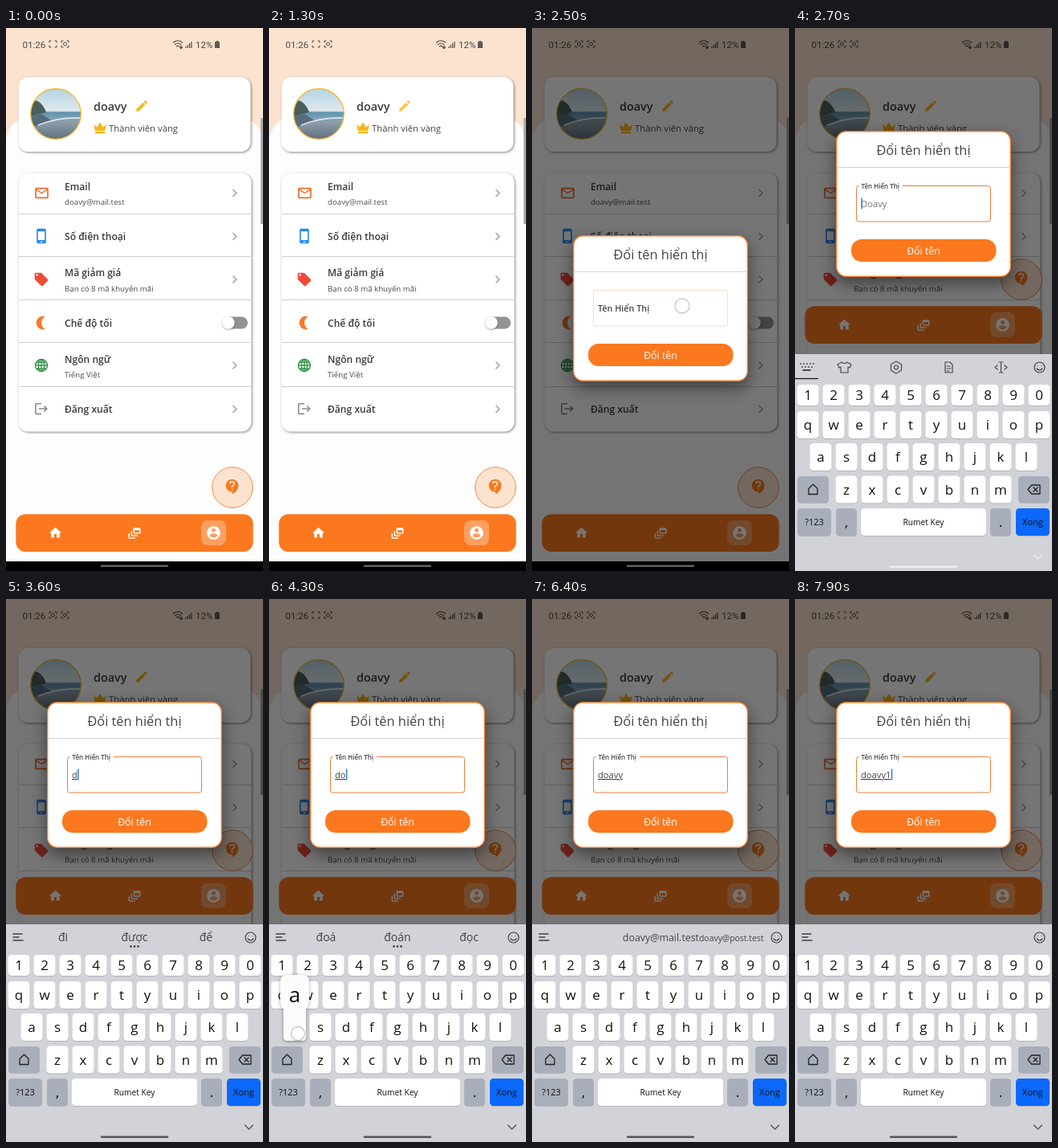
These frames come from a looping animation (320 px wide and 676 px high, 8 s). An HTML page:

```html
<!DOCTYPE html>
<html lang="vi">
<head>
<meta charset="utf-8">
<title>Đổi tên hiển thị</title>
<style>
html, body { margin: 0; width: 100%; height: 100%; overflow: hidden; background: #fff; }
svg.stage { display: block; width: 100%; height: 100%; }
text { font-family: 'Open Sans', 'Noto Sans', sans-serif; fill: #444; }
.head { font-size: 12.1px; font-weight: 600; fill: #3b3b3b; }
.sub { font-size: 9.7px; fill: #4c4c4c; }
.status text { font: 11.6px Roboto, 'Noto Sans', sans-serif; fill: #4d4946; }
.mid { text-anchor: middle; }
.line { fill: none; stroke-linecap: round; stroke-linejoin: round; }
.card { fill: #fff; filter: drop-shadow(1.5px 1.5px 1.6px #0007); }
.key { fill: #fff; }
.dark { fill: #a9aebb; }
.blue { fill: #0b68fb; }
.label { font-size: 17px; fill: #111; text-anchor: middle; }

.scrim, .dialog, .lift, .rise, .frame, .float, .rest, .tap, .tap2, .navline {
  animation: 8s linear infinite;
}
.rec { animation: rec 1s step-end infinite; }
.scrim { animation-name: scrim; }
.dialog { animation-name: dialog; }
.lift { animation-name: lift; }
.rise { animation-name: rise; }
.frame { animation-name: frame; }
.float { animation-name: float; }
.rest { animation-name: rest; }
.tap { animation-name: tap; }
.tap2 { animation-name: tap2; }
.navline { animation-name: navline; }

@keyframes rec { 0%, 85% { opacity: 0 } 35% { opacity: 1 } }
@keyframes scrim { 0%, 17.5% { opacity: 0 } 18.75% { opacity: .45 } 20.5%, 100% { opacity: .54 } }
@keyframes dialog {
  0%, 17.6% { opacity: 0; transform: none }
  18.75% { opacity: .77 }
  20.2% { opacity: 1 }
  31.8% { opacity: 1; transform: none }
  33.5%, 100% { opacity: 1; transform: translateY(-130px) }
}
@keyframes lift { 0%, 31.8% { transform: none } 33.5%, 100% { transform: translateY(-259px) } }
@keyframes rise { 0%, 31.6% { transform: translateY(272px) } 33.5%, 34.2% { transform: translateY(1px) } 35%, 100% { transform: none } }
@keyframes frame { 0%, 32% { stroke: #f9dcc6 } 33.5%, 100% { stroke: #e8803a } }
@keyframes float { 0%, 32.4% { opacity: 0 } 33.6%, 100% { opacity: 1 } }
@keyframes rest { 0%, 32.2% { opacity: 1 } 33%, 100% { opacity: 0 } }
@keyframes tap { 0%, 16% { opacity: 0 } 16.6%, 18.9% { opacity: .55 } 20%, 100% { opacity: 0 } }
@keyframes tap2 { 0%, 29.5% { opacity: 0 } 30%, 31.8% { opacity: 1 } 32.3%, 100% { opacity: 0 } }
@keyframes navline { 0%, 34.2% { stroke: #eceef2 } 36%, 100% { stroke: #55565c } }
</style>
</head>
<body>
<svg class="stage" viewBox="0 0 320 676" xmlns="http://www.w3.org/2000/svg">
<defs>
  <symbol id="pencil" viewBox="0 0 24 24"><path d="M3 17.25V21h3.75L17.81 9.94l-3.75-3.75zM20.71 7.04a1 1 0 0 0 0-1.41l-2.34-2.34a1 1 0 0 0-1.41 0l-1.83 1.83 3.75 3.75z"/></symbol>
  <symbol id="mail" viewBox="0 0 24 24"><path d="M22 6c0-1.1-.9-2-2-2H4c-1.1 0-2 .9-2 2v12c0 1.1.9 2 2 2h16c1.1 0 2-.9 2-2zm-2 0l-8 5-8-5zm0 12H4V8l8 5 8-5z"/></symbol>
  <symbol id="phone" viewBox="0 0 24 24"><path fill-rule="evenodd" d="M7 1h10a2 2 0 0 1 2 2v18a2 2 0 0 1-2 2H7a2 2 0 0 1-2-2V3a2 2 0 0 1 2-2zM7 5v13h10V5zM10 20v1.3h4V20z"/></symbol>
  <symbol id="tag" viewBox="0 0 24 24"><path d="M21.41 11.58l-9-9A2 2 0 0 0 11 2H4a2 2 0 0 0-2 2v7c0 .55.22 1.05.59 1.42l9 9a2 2 0 0 0 2.82 0l7-7a2 2 0 0 0 0-2.84zM5.5 7a1.5 1.5 0 1 1 0-3 1.5 1.5 0 0 1 0 3z"/></symbol>
  <symbol id="moon" viewBox="0 0 24 24"><path d="M17 2.5A10 10 0 1 0 17 21.5A11 11 0 0 1 17 2.5z"/></symbol>
  <symbol id="logout" viewBox="0 0 24 24"><path d="M17 7l-1.41 1.41L18.17 11H8v2h10.17l-2.58 2.58L17 17l5-5zM4 5h8V3H4a2 2 0 0 0-2 2v14a2 2 0 0 0 2 2h8v-2H4z"/></symbol>
  <symbol id="home" viewBox="0 0 24 24"><path d="M10 20v-6h4v6h5v-8h3L12 3 2 12h3v8z"/></symbol>
  <symbol id="feed" viewBox="0 0 24 24"><path d="M8 8H6v7a2 2 0 0 0 2 2h9v-2H8zM20 3h-8a2 2 0 0 0-2 2v6a2 2 0 0 0 2 2h8a2 2 0 0 0 2-2V5a2 2 0 0 0-2-2zm0 8h-8V7h8zM4 12H2v7a2 2 0 0 0 2 2h9v-2H4z"/></symbol>
  <symbol id="user" viewBox="0 0 24 24"><path d="M12 2a10 10 0 1 0 0 20 10 10 0 0 0 0-20zm0 3a3 3 0 1 1 0 6 3 3 0 0 1 0-6zm0 14.2a7.2 7.2 0 0 1-6-3.22c.03-1.99 4-3.08 6-3.08s5.97 1.09 6 3.08a7.2 7.2 0 0 1-6 3.22z"/></symbol>
  <symbol id="help" viewBox="0 0 24 24"><path d="M11.5 2a8.5 8.5 0 0 0 0 17h.5v3c4.86-2.34 8-7 8-11.5A8.5 8.5 0 0 0 11.5 2zm1 14.5h-2v-2h2zm0-3.5h-2c0-3.25 3-3 3-5a2 2 0 0 0-4 0h-2a4 4 0 0 1 8 0c0 2.5-3 2.75-3 5z"/></symbol>
  <path id="next" class="line" d="M-2.2-4L2-0L-2.2 4" stroke="#999" stroke-width="1.3"/>
  <path id="corners" class="line" d="M-4.5-2v-2h2M2.5-4h2v2M4.5 2v2h-2M-2.5 4h-2v-2" stroke="#4d4946"/>
  <linearGradient id="photo" x2="0" y2="1">
    <stop offset="0" stop-color="#b3d3e4"/><stop offset=".44" stop-color="#dfe9ec"/>
    <stop offset=".47" stop-color="#5f92ad"/><stop offset=".6" stop-color="#7fa5b6"/>
    <stop offset=".68" stop-color="#8d9ba6"/><stop offset="1" stop-color="#5d6e80"/>
  </linearGradient>
  <clipPath id="round"><circle cx="62" cy="107" r="31"/></clipPath>
</defs>

<rect width="320" height="676" fill="#fbe3d0"/>
<rect y="110" width="320" height="600" rx="32" fill="#fdfdfd"/>

<rect class="card" x="15.5" y="61" width="289" height="93" rx="12"/>
<g clip-path="url(#round)">
  <rect x="30" y="75" width="64" height="64" fill="url(#photo)"/>
  <path d="M30 93q6-5 11-1 6 4 9 13l-20 5z" fill="#4a5f5c"/>
  <path d="M30 110l14-3 14 9-28 8z" fill="#566b7c"/>
  <path d="M40 121q24-10 54-9" stroke="#dfe5e7" stroke-width="1.6" fill="none"/>
</g>
<circle cx="62" cy="107" r="31.300" fill="none" stroke="#f3b11d" stroke-width="1.200"/>
<text x="109" y="103" font-size="14.4" font-weight="600" style="fill:#3b3b3b">doavy</text>
<use href="#pencil" x="160" y="88" width="18" height="18" fill="#fbb41a"/>
<path d="M109 120l4 3.6 4-6 4 6 4-3.6-1.8 8h-12.4zM111 129h12v2.3h-12z" fill="#fdb515"/>
<text x="128" y="129" font-size="11.3">Thành viên vàng</text>

<rect class="card" x="15.5" y="180.5" width="290" height="322" rx="12"/>
<path d="M16 231.500h289M16 284.500h289M16 338.500h289M16 391.500h289M16 446.500h289" stroke="#cfcfcf"/>
<use href="#mail" x="34.500" y="195.500" width="20" height="20" fill="#f0682a"/>
<use href="#phone" x="34" y="249" width="20" height="20" fill="#2a8bee"/>
<use href="#tag" x="34" y="303" width="20" height="20" fill="#f04a38"/>
<use href="#moon" x="34.500" y="357" width="20" height="20" fill="#f8792a"/>
<g fill="none" stroke="#369447" stroke-width="1.4">
  <circle cx="44" cy="420" r="7.500"/><ellipse cx="44" cy="420" rx="3.600" ry="7.500"/>
  <path d="M44 412.500v15M36.500 420h15M38 416h12M38 424h12"/>
</g>
<use href="#logout" x="34.500" y="464.500" width="19" height="19" fill="#8c8c8c"/>
<text class="head" x="73" y="202">Email</text>
<text class="sub" x="73" y="220">doavy@mail.test</text>
<text class="head" x="73" y="264">Số điện thoại</text>
<text class="head" x="73" y="309">Mã giảm giá</text>
<text class="sub" x="73" y="327.500">Bạn có 8 mã khuyến mãi</text>
<text class="head" x="73" y="372">Chế độ tối</text>
<text class="head" x="73" y="416.500">Ngôn ngữ</text>
<text class="sub" x="73" y="435">Tiếng Việt</text>
<text class="head" x="73" y="479">Đăng xuất</text>
<use href="#next" x="285" y="205.500"/><use href="#next" x="285" y="259.500"/>
<use href="#next" x="285" y="313"/><use href="#next" x="285" y="420"/><use href="#next" x="285" y="474.500"/>
<rect x="271" y="359.500" width="30" height="15" rx="7.500" fill="#929292"/>
<circle cx="277" cy="367" r="7.700" fill="#fff" style="filter:drop-shadow(0 1px 1px #0005)"/>
<rect x="317" y="112" width="3" height="132" fill="#a9a9a9"/>

<g class="lift">
  <circle cx="282" cy="572" r="25.300" fill="#fbe3d0" stroke="#ef8a46"/>
  <use href="#help" x="271" y="560" width="22" height="22" fill="#f8781e"/>
  <rect x="12.300" y="605.300" width="295.400" height="46.700" rx="12" fill="#fb781e"/>
  <rect x="243" y="613" width="31" height="31" rx="8" fill="#fff" opacity=".3"/>
  <g fill="#fff">
    <use href="#home" x="52.500" y="619.500" width="18" height="18"/>
    <use href="#feed" x="151" y="620" width="18" height="18"/>
    <use href="#user" x="248.500" y="618.500" width="20" height="20"/>
  </g>
</g>

<g class="status">
  <text x="20.500" y="24.500">01:26</text>
  <use href="#corners" x="58.500" y="20"/>
  <circle class="rec" cx="58.500" cy="20" r="2" fill="none" stroke="#4d4946"/>
  <use href="#corners" x="73.500" y="20"/>
  <circle cx="73.500" cy="20" r="2" fill="none" stroke="#4d4946"/>
  <path class="line" d="M208.500 18q5.500-4.500 11 0M210.500 20.500q3.500-3 7 0M212.500 22.800q1.500-1.300 3 0M218 22v3M216.500 24l1.500 1.500 1.500-1.500" stroke="#4d4946" stroke-width="1.200"/>
  <path d="M224 25v-2M226.300 25v-4M228.600 25v-6M230.900 25v-8" stroke="#4d4946" stroke-width="1.200"/>
  <text x="236" y="24.500">12%</text>
  <path d="M261.500 16h3v1.300h1.500V25h-6v-7.700h1.500z" fill="#5d5854"/>
</g>

<rect class="scrim" width="320" height="676"/>

<rect y="664" width="320" height="12"/>
<path class="line" d="M119 669.700h82" stroke="#626262" stroke-width="2.400"/>

<circle class="tap" cx="169" cy="97" r="9" fill="#fff" style="filter:drop-shadow(0 0 1.5px #fff)"/>

<g class="dialog">
  <rect x="51.700" y="258.700" width="216.600" height="180.600" rx="12" fill="#fff" stroke="#f27f30" stroke-width="1.400" style="filter:drop-shadow(0 8px 10px #0007)"/>
  <text class="mid" x="160" y="287.500" font-size="16.400">Đổi tên hiển thị</text>
  <path d="M53 303.500h214" stroke="#d2d2d2"/>
  <rect class="frame" x="76.500" y="326.500" width="167" height="44.500" rx="3" fill="#fff"/>
  <text class="rest" x="82" y="353" font-size="10.800" font-weight="600">Tên Hiển Thị</text>
  <g class="float">
    <rect x="80" y="325" width="54" height="4" fill="#fff"/>
    <text x="82.500" y="330" font-size="8" font-weight="600">Tên Hiển Thị</text>
  </g>
  <text id="hint" x="82" y="353" font-size="11.200" style="fill:#777">Doavy</text>
  <text id="typed" x="82" y="353" font-size="11.200" text-decoration="underline"></text>
  <rect id="caret" y="341.500" width="1.500" height="14" fill="#2f7fd6"/>
  <rect x="70" y="393" width="180.500" height="28" rx="13" fill="#fb781e"/>
  <text class="mid" x="160" y="412" font-size="12.400" style="fill:#fff">Đổi tên</text>
</g>
<circle class="tap2" cx="187" cy="346" r="9" fill="#fffc" stroke="#c9d0d4" stroke-width="1.500"/>

<g class="rise">
  <rect y="405" width="320" height="271" fill="#d1d3d8"/>
  <g id="tools" class="line" stroke="#4a4b50" stroke-width="1.200">
    <path d="M7 417h.1M11 417h.1M15 417h.1M19 417h.1M23 417h.1M9 421h.1M13 421h.1M17 421h.1M21 421h.1M10 425h9" stroke-width="1.800"/>
    <path d="M0 435.500h29" stroke="#111" stroke-linecap="butt"/>
    <path d="M58 415l-5 3 2 4 2-1v7h9v-7l2 1 2-4-5-3q-3.500 3-7 0z"/>
    <path d="M126 414l6.500 3.700v7.600l-6.500 3.700-6.500-3.700v-7.600z"/><circle cx="126" cy="421.500" r="2.500"/>
    <path d="M187 415h6l3 3v10h-9zM189 420h4M189 423h5M189 426h3"/>
    <path d="M254 415h5M256.500 415v13M254 428h5M252 419l-3 2.500 3 2.500M261 419l3 2.500-3 2.500"/>
  </g>
  <g id="bar">
    <path class="line" d="M9 417h11M9 421h7M9 425h12" stroke="#3f4046" stroke-width="1.500"/>
    <g id="words"></g>
    <path id="more" class="line" d="M155.500 432.500h.1M160 432.500h.1M164.500 432.500h.1" stroke="#333" stroke-width="2.600"/>
  </g>
  <g class="line" stroke="#3f4046" stroke-width="1.200">
    <circle cx="304.500" cy="421.500" r="6.500"/><path d="M301 423q3.500 4 7 0M302 419.500h.1M307 419.500h.1"/>
  </g>
  <g id="keys"></g>
  <g class="line" stroke="#222" stroke-width="1.300">
    <path d="M22.500 567l5.500 5.500v7H17v-7z"/>
    <path d="M290 573.500l4.500-5.500H305v11h-10.500zM297 571l5 5M302 571l-5 5"/>
  </g>
  <path class="line navline" d="M297.500 655l5 5 5-5" stroke-width="1.400"/>
  <path class="line navline" d="M119 669.700h82" stroke-width="2.400"/>
  <g id="popup">
    <path d="M-10-65h20q8 0 8 9v22q0 7-4 12v34q0 5-5 5H-9q-5 0-5-5v-34q-4-5-4-12v-22q0-9 8-9z" fill="#fcfcfc" style="filter:drop-shadow(0 1px 2px #0005)"/>
    <text id="big" class="label" y="-31" style="font-size:26px"></text>
    <circle cx="4" cy="8" r="8.500" fill="#fffc" stroke="#c4c7cb" stroke-width="1.300"/>
  </g>
</g>
</svg>

<script>
const $ = id => document.getElementById(id);
const show = (id, on) => $(id).setAttribute('visibility', on ? 'visible' : 'hidden');

// Keyboard: letters, x of first key centre, y of row centre, key height
const rows = [
  ['1234567890', 16, 456, 26],
  ['qwertyuiop', 16, 493, 34],
  ['asdfghjkl', 32, 533, 34],
  ['zxcvbnm', 64, 573.5, 34]
];
const spot = {};
const key = (x, y, w, h, label = '', cls = 'key', size = 17) =>
  `<rect x="${x}" y="${y + 1}" width="${w}" height="${h}" rx="4.5" fill="#b2b4bb"/>
   <rect class="${cls}" x="${x}" y="${y}" width="${w}" height="${h}" rx="4.5"/>
   <text class="label" x="${x + w / 2}" y="${y + h / 2 + size * .36}" style="font-size:${size}px">${label}</text>`;

let keys = '';
for (const [letters, x0, y, h] of rows) {
  [...letters].forEach((c, i) => {
    const x = x0 + 32 * i;
    spot[c] = [x, y];
    keys += key(x - 13.5, y - h / 2, 27, h, c);
  });
}
keys += key(3, 557, 39, 33, '', 'dark') + key(278, 557, 39, 33, '', 'dark')
  + key(3, 597, 42, 34, '?123', 'dark', 11) + key(51, 597, 26, 34, ',', 'dark')
  + key(82, 597, 156, 34, 'Rumet Key', 'key', 10.2) + key(243, 597, 26, 34, '.', 'dark')
  + key(275, 597, 42, 34, 'Xong', 'blue', 11);
$('keys').innerHTML = keys;

// Key presses: letter, finger down, finger up
const presses = [
  ['d', 3380, 3480], ['o', 3780, 3890], ['a', 4190, 4390],
  ['v', 4700, 4860], ['y', 5380, 5490], ['1', 6760, 6880]
];
const focusTime = 2600;

// Suggestions: start time, words
const hints = [
  [3480, 'đi', 'được', 'để'],
  [3890, 'đoá', 'đoán', 'đọc'],
  [4390, 'doa', 'đoán', 'doanh'],
  [4980, '', 'doav', ''],
  [5580, 'mail'],
  [6980]
];
const word = (s, x, size = 14, anchor = 'middle') =>
  `<text x="${x}" y="426" font-size="${size}" text-anchor="${anchor}">${s}</text>`;

let shownHint;
function suggest(t) {
  const hint = hints.filter(h => h[0] <= t).pop();
  if (hint === shownHint) return;
  shownHint = hint;
  const words = hint ? hint.slice(1) : [];
  $('words').innerHTML = words[0] === 'mail'
    ? word('doavy@mail.test', 208, 12.4, 'end') + word('doavy@post.test', 208, 10.4, 'start')
    : words.map((w, i) => word(w, 71 + 89 * i)).join('');
  $('more').style.display = words.length === 3 ? '' : 'none';
}

function draw(t) {
  const done = presses.filter(p => p[2] <= t);
  const text = done.map(p => p[0]).join('');
  const typed = $('typed');
  if (typed.textContent !== text) typed.textContent = text;
  show('hint', t > focusTime && !text);

  const since = t - (done.length ? done[done.length - 1][2] : focusTime);
  show('caret', since >= 0 && since % 1000 < 500);
  $('caret').setAttribute('x', 82.3 + (text ? typed.getComputedTextLength() : 0));

  const typing = t >= presses[0][2];
  show('tools', !typing);
  show('bar', typing);
  suggest(t);

  const press = presses.find(p => p[1] <= t && t < p[2]);
  $('popup').style.display = press ? '' : 'none';
  if (press) {
    $('big').textContent = press[0];
    $('popup').setAttribute('transform', `translate(${spot[press[0]]})`);
  }
}

let start;
function tick(now) {
  start ??= now;
  draw((now - start) % 8000);
  requestAnimationFrame(tick);
}
draw(0);
requestAnimationFrame(tick);
</script>
</body>
</html>
```
